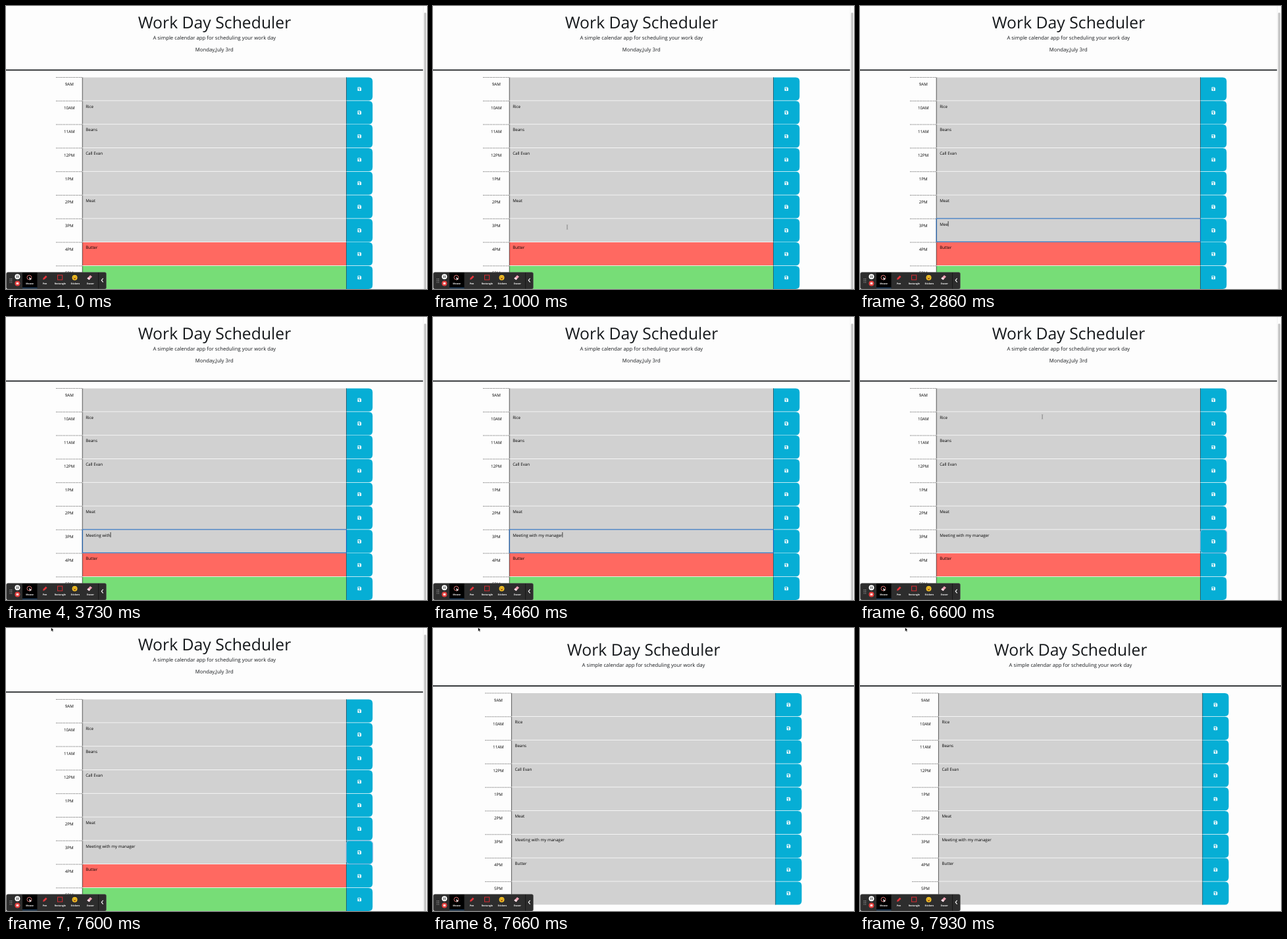
An HTML page that plays this animation: 640 px wide and 430 px high, repeating every 8 s.

```html
<!DOCTYPE html>
<html lang="en">
<head>
<meta charset="utf-8">
<title>Work Day Scheduler</title>
<style>
  html, body { margin: 0; width: 100%; height: 100%; overflow: hidden; background: #fdfdfd; }
  svg { display: block; }
  text { font-family: "Open Sans", "Noto Sans", sans-serif; fill: #16191c; text-rendering: geometricPrecision; }
  .title { font-size: 24.75px; }
  .sub { font-size: 7.75px; }
  .cell { font-size: 6.2px; fill: #000; }
  .mid { text-anchor: middle; }
  .tool { font-size: 3.5px; font-weight: 700; fill: #fff; }
</style>
</head>
<body>
<svg width="640" height="430" viewBox="0 0 640 430">
  <defs>
    <path id="disk" fill-rule="evenodd" d="M-2.2-2.8H1.4L2.8-1.4V2.2Q2.8 2.8 2.2 2.8H-2.2Q-2.8 2.8-2.8 2.2V-2.2Q-2.8-2.8-2.2-2.8ZM-1.9-1.9V-.5H1.1V-1.9ZM-1 1.1A1 1 0 1 0 1 1.1A1 1 0 1 0-1 1.1Z"/>
  </defs>
  <rect width="640" height="430" fill="#fdfdfd"/>

  <g id="header" class="mid">
    <text class="title" x="317" y="34.4">Work Day Scheduler</text>
    <text class="sub" x="316.8" y="51">A simple calendar app for scheduling your work day</text>
  </g>
  <text id="date" class="sub mid" x="316.8" y="69">Monday,July 3rd</text>
  <rect id="rule" height="1.7" fill="#16191c"/>
  <g id="scrollbar">
    <path d="M634.3 0V430" stroke="#e8e8e8" stroke-width=".6"/>
    <rect x="635.6" y="10" width="3.2" height="424" rx="1.6" fill="#c3c3c3"/>
  </g>

  <g id="planner">
    <g id="rows"></g>
    <rect id="focusBox" x="116.2" y="322.9" width="401.3" height="35.4" fill="none" stroke="#1a63b8" stroke-width="1.1"/>
    <rect id="focusButton" x="517.3" y="323" width="40.4" height="35.6" rx="5" fill="none" stroke="#8fb8e0" stroke-width="1"/>
    <rect id="caret" y="327" width=".7" height="7.8"/>
  </g>

  <g id="toolbar">
    <rect x=".5" y="404.6" width="152" height="25.4" rx="2.5" fill="#2d2d2d" stroke="#777" stroke-width=".4"/>
    <rect x="25" y="405" width="22.5" height="24" fill="#000"/>
    <path d="M25 428.4H47.5" stroke="#3b82c4" stroke-width=".7"/>
    <path d="M6.2 414.3V421M8.6 414.3V421" stroke="#bbb" stroke-width="1.1" stroke-dasharray="1.1 1.5"/>
    <circle cx="17.4" cy="411.2" r="4" fill="#fff"/>
    <path d="M16.3 409.4V413M18.6 409.4V413" stroke="#333" stroke-width="1"/>
    <circle cx="17.4" cy="421.5" r="4" fill="#e5403f"/>
    <rect x="15.8" y="419.9" width="3.2" height="3.2" rx=".4" fill="#fff"/>
    <circle cx="35.4" cy="412.5" r="3.4" fill="none" stroke="#f08080" stroke-width=".9"/>
    <path d="M35.2 411.8L36.2 417L37.3 415.3L39.2 415.2Z" fill="#fff"/>
    <path d="M56 416L56.8 413.3L60.6 409.5L62.5 411.4L58.7 415.2Z" fill="#e5343a"/>
    <rect x="78.5" y="409" width="7.2" height="7" fill="none" stroke="#d92b32" stroke-width="1"/>
    <circle cx="104.5" cy="412.7" r="4" fill="#f7c325"/>
    <path d="M102.2 413.6Q104.5 416.8 106.8 413.6Z" fill="#8a3b14"/>
    <path d="M102.9 411.2V412.2M106.1 411.2V412.2" stroke="#5a3410" stroke-width=".9"/>
    <path d="M123.3 414L128 409L131 411.2L126.4 416.2Z" fill="#f0a3b5"/>
    <path d="M123.3 414L125 412.2L128 414.4L126.4 416.2Z" fill="#f7e3e8"/>
    <path d="M140.6 405V429.5" stroke="#111" stroke-width=".7"/>
    <path d="M147.6 413.8L145.2 416.7L147.6 419.6" fill="none" stroke="#fff" stroke-width="1.1"/>
    <g id="toolNames" class="mid"></g>
  </g>

  <g id="pointer">
    <path id="arrow" d="M0 0V6.2L1.4 4.9L2.3 7L3.3 6.6L2.4 4.6H4.3Z" fill="#000" stroke="#fff" stroke-width=".5"/>
    <path id="beam" d="M-1.2-3.4Q0-3.4 0-2.6V2.6Q0 3.4-1.2 3.4M1.2-3.4Q0-3.4 0-2.6V2.6Q0 3.4 1.2 3.4" fill="none" stroke="#777" stroke-width=".5"/>
    <path id="hand" d="M-.6-.8Q0-1.4.6-.8V1L2.4 1.5Q3 1.8 2.8 2.6L2.3 4.6H-.5L-2 2.5Q-1.9 1.8-.6 2.5Z" fill="#fff" stroke="#000" stroke-width=".6"/>
  </g>
</svg>

<script>
const LOOP = 8000, TOP = 108.3, PITCH = 35.8, RELOAD = 7660;
const ENTER = 60, FOCUS = 1530, TYPE = 2460, MOVE = 5130, CLICK = 6130, BLINK = 530;
const NOTE = "Meeting with my manager", NOTE_ROW = 6;
const hours = ["9AM", "10AM", "11AM", "12PM", "1PM", "2PM", "3PM", "4PM", "5PM"];
const notes = ["", "Rice", "Beans", "Call Evan", "", "Meat", "", "Butter", ""];
const PAST = "#d1d1d1", NOW = "#ff6961", NEXT = "#77dd77";

const $ = id => document.getElementById(id);
const show = (id, on) => $(id).setAttribute("display", on ? "inline" : "none");
const shift = (id, x, y, s = 1) => $(id).setAttribute("transform", `translate(${x} ${y}) scale(${s})`);

$("rows").innerHTML = hours.map((hour, i) => `<g transform="translate(0 ${TOP + i * PITCH})">
  <path d="M76 .2H116" stroke="#444" stroke-width=".7" stroke-dasharray="1.5 1"/>
  <text class="cell mid" x="96.2" y="13.1">${hour}</text>
  <rect id="box${i}" x="116" y=".2" width="401.3" height="35"/>
  <path d="M116.2 0V35.4" stroke="#222" stroke-width=".7"/>
  <text id="note${i}" class="cell" x="121.2" y="10.6">${notes[i]}</text>
  <path d="M517.3 .2H551.3Q557.3 .2 557.3 6.2V29.3Q557.3 35.3 551.3 35.3H517.3Z" fill="#06aed5"/>
  <path d="M517.5 0V35.4" stroke="#1c3d49" stroke-width=".7"/>
  <use id="disk${i}" href="#disk"/>
</g>`).join("");

$("toolNames").innerHTML = [["Mouse", 36], ["Pen", 59], ["Rectangle", 82.3], ["Stickers", 105.3], ["Eraser", 128.3]]
  .map(([name, x]) => `<text class="tool" x="${x}" y="422.8">${name}</text>`).join("");

// Keyframes: time, then values
const path = [[ENTER, 290, 28], [930, 204, 336], [MOVE, 204, 336], [5530, 586, 331],
  [5900, 538.2, 342.6], [6370, 538.2, 342.6], [6800, 68.5, -1]];
const typed = [[TYPE, 1], [2660, 2], [2800, 3], [2900, 3], [3260, 7], [3400, 8],
  [4200, 18], [4260, 19], [4660, 23]];
const smooth = u => u * u * (3 - 2 * u);

function at(keys, t, ease = u => u) {
  const next = keys.findIndex(k => k[0] > t);
  if (next < 0) return keys[keys.length - 1].slice(1);
  if (!next) return keys[0].slice(1);
  const a = keys[next - 1], b = keys[next];
  const u = ease((t - a[0]) / (b[0] - a[0]));
  return a.slice(1).map((v, i) => v + (b[i + 1] - v) * u);
}

function caretOn(t) {
  if (t < FOCUS || t >= CLICK) return false;
  if (t < TYPE) return t < FOCUS + BLINK;
  return t < MOVE || t >= MOVE + BLINK;
}

function draw(t) {
  const fresh = t >= RELOAD;
  shift("header", fresh ? 3.2 : 0, fresh ? 8.1 : 0);
  shift("planner", fresh ? 3.2 : 0, fresh ? -9.5 : 0);
  show("date", !fresh);
  show("scrollbar", !fresh);
  $("rule").setAttribute("y", fresh ? 87.2 : 96.5);
  $("rule").setAttribute("width", fresh ? 640 : 634);

  const [x, y] = at(path, t, smooth);
  const inRows = y > TOP;
  const onButton = inRows && x > 517 && x < 557;
  const onBox = inRows && x > 116 && x <= 517;
  const onDisk = Math.abs(x - 537.3) < 4 && inRows;

  hours.forEach((_, i) => {
    $("box" + i).setAttribute("fill", fresh || i < 7 ? PAST : i === 7 ? NOW : NEXT);
    const big = onDisk && i === NOTE_ROW;
    shift("disk" + i, 537.3, 17.8, big ? 1.2 : 1);
    $("disk" + i).setAttribute("fill", big ? "#111" : "#fff");
  });

  const note = $("note" + NOTE_ROW);
  const count = t < TYPE ? 0 : Math.floor(at(typed, t)[0] + 1e-6);
  note.textContent = NOTE.slice(0, count);
  show("caret", caretOn(t));
  $("caret").setAttribute("x", 121.2 + (count ? note.getComputedTextLength() : 0));
  show("focusBox", t >= FOCUS && t < CLICK);
  show("focusButton", t >= CLICK && !fresh);

  shift("pointer", x, y);
  show("pointer", t >= ENTER && t < TYPE || t >= MOVE);
  show("arrow", !onButton && !onBox);
  show("beam", onBox);
  show("hand", onButton);
}

const start = performance.now();
function tick() {
  draw((performance.now() - start) % LOOP);
  requestAnimationFrame(tick);
}
tick();
</script>
</body>
</html>
```
